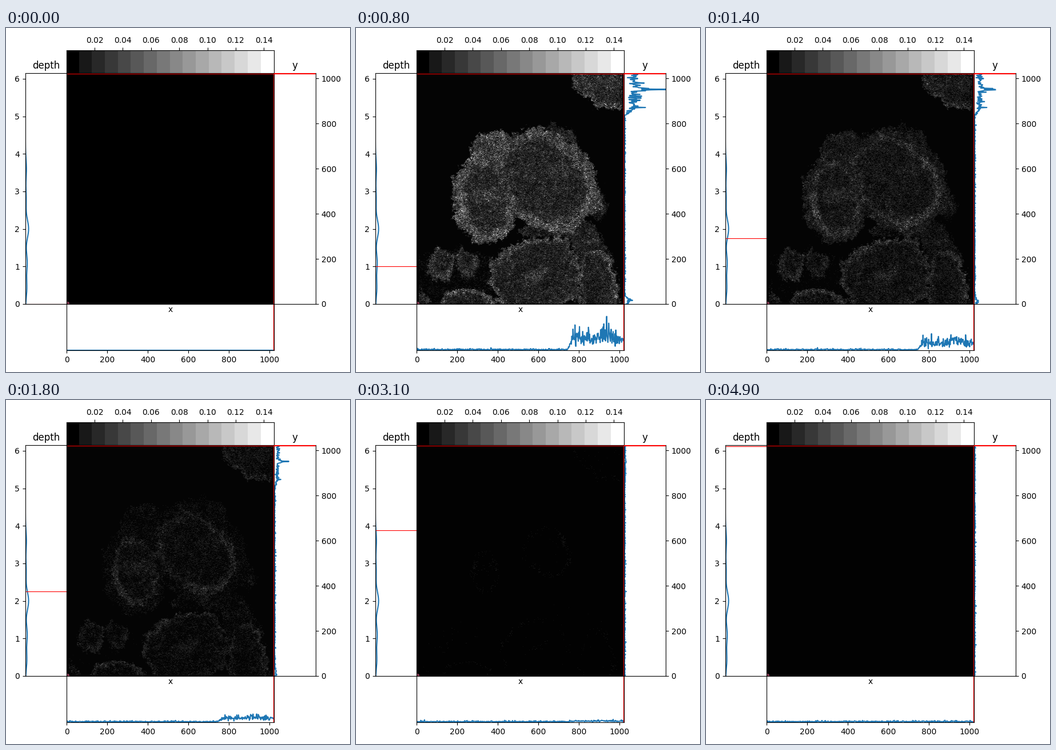
A matplotlib script for the animation above (5 s loop, 602 px wide and 602 px high).

```python
import numpy as np
import matplotlib.pyplot as plt
from matplotlib.animation import FuncAnimation

SIZE, FRAMES, DEPTH, SPAN = 602, 50, 6.15, 1024
LEFT, TOP, WIDE, TALL = 106.3, 79.0, 362.9, 404.0
RIGHT, BOTTOM = LEFT + WIDE, TOP + TALL
BLUE = "#1f77b4"
plt.rcParams.update({"font.family": "DejaVu Sans", "font.size": 10})


def falloff(depth, peak, middle, power):
    """Quick rise at the surface, then a smooth decay with depth."""
    return peak * (1 - np.exp(-depth / 0.2)) / (1 + (depth / middle) ** power)


def smoothstep(x, lo, hi):
    t = np.clip((x - lo) / (hi - lo), 0, 1)
    return t * t * (3 - 2 * t)


# ---------------------------------------------------------------- tissue
COLS, ROWS = 363, 404
X, Y = np.meshgrid(LEFT + np.arange(COLS) + 0.5, TOP + np.arange(ROWS) + 0.5)


def soft_noise(seed, passes):
    a = np.random.default_rng(seed).normal(size=X.shape)
    for _ in range(passes):
        for axis in (0, 1):
            a = (np.roll(a, 1, axis) + a + np.roll(a, -1, axis)) / 3
    return a / a.std()


RAGGED = 1.5 * soft_noise(1, 1) + 2 * soft_noise(2, 5) + 2.5 * soft_noise(5, 60)
CLUMPS = np.exp(0.14 * soft_noise(3, 2) + 0.12 * soft_noise(4, 30))


class Blob:
    """Tilted superellipse with a ragged outline and a brighter rim."""

    def __init__(self, cx, cy, rx, ry, tilt=0, fill=1, rim=0, facing=0, shrink=0, power=2.3):
        theta = np.arctan2(Y - cy, X - cx)
        u = theta - tilt
        edge = ((np.abs(np.cos(u)) / rx) ** power
                + (np.abs(np.sin(u)) / ry) ** power) ** (-1 / power)
        self.r, self.edge = np.hypot(X - cx, Y - cy) + RAGGED, edge
        self.rim = rim * (1 + 0.35 * np.cos(theta - facing))
        self.fill, self.shrink = fill, shrink

    def over(self, img, scale, fill, ring=0, grow=0):
        gap = self.r - grow - self.edge * (1 - self.shrink * (1 - scale))
        mask = 1 / (1 + np.exp(np.clip(gap / 1.2, -40, 40)))
        body = fill * self.fill + ring * self.rim * np.exp(-((gap + 3) / 7) ** 2)
        return img * (1 - mask) + body * mask


NUCLEI = [
    Blob(226, 301, 45, 66, -0.1, rim=0.6, facing=2.6, shrink=1),
    Blob(333, 268, 87, 69, 0.75, rim=0.6, facing=0.4, shrink=1),
]
FRINGE = [
    Blob(172, 440, 72, 58, fill=0.3, power=3),
    Blob(358, 190, 30, 20, 0.3, fill=0.8),
    Blob(424, 318, 12, 27, 0.1, fill=0.7),
    Blob(345, 355, 62, 13, fill=0.8),
    Blob(418, 425, 33, 95, -0.25, fill=0.85),
]
BRIDGE = Blob(247, 225, 34, 34)
CELLS = NUCLEI + [
    Blob(316, 435, 80, 67, -0.35, 0.9, 0.5, -2.4, 0.5, 2.6),
    Blob(424, 465, 34, 78, -0.1, 0.85, 0.45, -1.2, 0.3),
    Blob(150, 415, 24, 27, 0, 0.85, 0.4),
    Blob(195, 413, 21, 23, 0, 0.75, 0.25),
    Blob(195, 487, 50, 29, 0, 0.8, 0.6, -1.6),
    Blob(108, 481, 22, 24, 0, 0.8, 0.4, -0.6),
    Blob(455, 70, 80, 72, 0.15, 1.1, 0.4, 1.8, 0, 2),
]
NUCLEOLI = sum(np.exp(-((X - x) ** 2 + (Y - y) ** 2) / 200)
               for x, y in [(224, 293), (316, 438), (347, 352)])


def slice_image(i, depth):
    if i == 0:
        return np.zeros(X.shape)
    fill = falloff(depth, 46, 1.7, 2.8)
    ring = falloff(depth, 70, 1.9, 3)
    cyto = falloff(depth, 100, 1.3, 3.5)
    scale = 1 - 0.45 * smoothstep(depth, 1.2, 4)
    img = np.zeros(X.shape)
    for blob in FRINGE:
        img = blob.over(img, 1, fill)
    for blob in [BRIDGE] + NUCLEI:
        img = blob.over(img, 1, cyto, grow=11)
    for blob in CELLS:
        img = blob.over(img, scale, fill, ring)
    img += 0.6 * fill * NUCLEOLI
    grain = np.random.default_rng(100 + i).gamma(3, 1 / 3, X.shape)
    grain = 0.75 * grain + 0.25 * np.roll(grain, 1, 1)
    img = img * grain * CLUMPS
    img[img < 14] = 4 if depth < 3.5 else 2.5
    img[:, :4] = 0
    img[:, -3:] = 0
    return np.minimum(img, 255)


# ---------------------------------------------------------------- profiles
POS = np.linspace(0, SPAN, 512)


def bump(center, width, height):
    return height * np.exp(-((POS - center) / width) ** 2 / 2)


COLUMN = 15 * smoothstep(POS, 832, 870) + bump(953, 4, 34) + bump(15, 12, 8)
ROW = 17 * smoothstep(POS, 738, 780) + bump(785, 12, 10) + bump(925, 35, 12)


def profile(shape, i, depth, seed):
    if i == 0:
        return np.zeros(POS.size)
    steady = np.random.default_rng(seed).gamma(4, 1 / 4, POS.size)
    rng = np.random.default_rng(1000 * seed + i)
    wobble = 0.6 * steady + 0.4 * rng.gamma(3, 1 / 3, POS.size)
    return falloff(depth, 1.2, 1.75, 4) * shape * wobble + rng.gamma(3, 0.35, POS.size)


# ---------------------------------------------------------------- figure
fig = plt.figure(figsize=(SIZE / 100, SIZE / 100), dpi=100, facecolor="white")


def panel(x, y, w, h, xlim, ylim):
    ax = fig.add_axes([x / SIZE, 1 - (y + h) / SIZE, w / SIZE, h / SIZE])
    ax.set(xlim=xlim, ylim=ylim)
    ax.patch.set_visible(False)
    return ax


full = (0, SPAN)
main = panel(LEFT, TOP, WIDE, TALL, full, full)
bar = panel(LEFT, TOP - TALL / 10, WIDE, TALL / 10, (0.0002, 0.1473), (0, 1))
side = panel(LEFT - WIDE / 5, TOP, WIDE / 5, TALL, (0, WIDE / 5), (0, DEPTH))
right = panel(RIGHT, TOP, WIDE / 5, TALL, (0, WIDE / 5), full)
below = panel(LEFT, BOTTOM, WIDE, TALL / 5, full, (0, TALL / 5))

main.set(xticks=[], yticks=[])
main.set_xlabel("x", labelpad=2.5)
picture = main.imshow(np.zeros(X.shape), cmap="gray", vmin=0, vmax=255,
                      extent=(0, SPAN, 0, SPAN), aspect="auto", interpolation="nearest")
main.plot(0, 0, "o", ms=6, color="#8a3a55")

edges = np.r_[0.0002, 0.0088 + 0.00921 * np.arange(15), 0.1473]
grays = (np.arange(16) + 0.5) / 16
grays[0], grays[-1] = 0, 1
bar.pcolormesh(edges, [0, 1], grays[None], cmap="gray", vmin=0, vmax=1)
bar.set(xticks=np.arange(0.02, 0.15, 0.02), yticks=[])
bar.xaxis.set_major_formatter("{x:.2f}")
bar.xaxis.tick_top()

side.set_title("depth")
side.set(xticks=[], yticks=range(7))
z = np.linspace(0, DEPTH, 300)
side.plot(0.2 + sum(h * np.exp(-((z - c) / 0.25) ** 2 / 2) for c, h in
                    [(0.42, 2.5), (1.1, 3.2), (2, 5.6), (2.8, 1.4), (3.6, 1.8)]),
          z, color=BLUE)
marker = side.axhline(0, color="red", lw=0.8)

right.set_title("y")
right.set(xticks=[], yticks=range(0, 1001, 200))
right.yaxis.tick_right()
column_line, = right.plot([], [], color=BLUE)

below.set(xticks=range(0, 1001, 200), yticks=[])
row_line, = below.plot([], [], color=BLUE)

for ax in (main, below):
    ax.axvline(1020, color="red", lw=0.8)
for ax in (main, right):
    ax.axhline(1021, color="red", lw=1.5, zorder=3)


def update(i):
    depth = i / 8
    picture.set_data(slice_image(i, depth))
    marker.set_ydata([depth, depth])
    column_line.set_data(profile(COLUMN, i, depth, 5), POS)
    row_line.set_data(POS, profile(ROW, i, depth, 8))
    return picture, marker, column_line, row_line


animation = FuncAnimation(fig, update, frames=FRAMES, interval=100, repeat=True)
plt.show()
```
